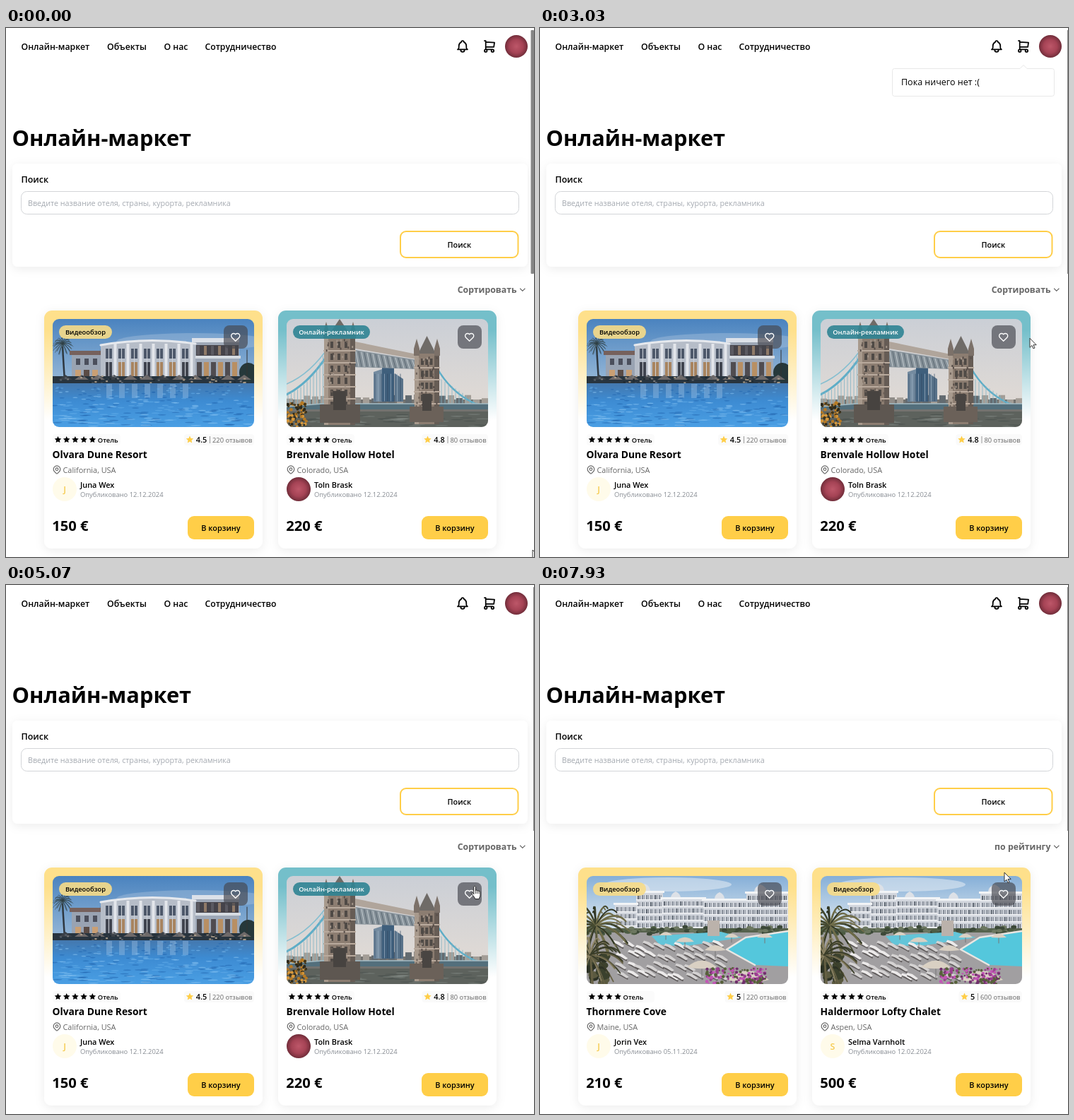
These frames come from a looping animation (747x749 px, 8 s). An HTML page:

```html
<!DOCTYPE html>
<html lang="ru">
<head>
<meta charset="utf-8">
<style>
html, body { margin: 0; width: 100%; height: 100%; overflow: hidden; background: #fff; }
svg { display: block; width: 747px; height: 749px; font-family: "Open Sans", "Noto Sans", sans-serif; }
</style>
</head>
<body>
<svg id="stage" viewBox="0 0 747 749"></svg>
<script>
const LOOP = 8000;
const YELLOW = '#ffce48', PALE = '#fee08b', TEAL = '#74bfca', GREY = '#868b92';

// Markup helpers
const rect = (x, y, w, h, fill, extra = '') =>
  `<rect x="${x}" y="${y}" width="${w}" height="${h}" fill="${fill}" ${extra}/>`;
const path = (d, fill, extra = '') => `<path d="${d}" fill="${fill}" ${extra}/>`;
const line = (d, color, width = 1, extra = '') =>
  path(d, 'none', `stroke="${color}" stroke-width="${width}" stroke-linecap="round" stroke-linejoin="round" ${extra}`);
const circle = (x, y, r, fill) => `<circle cx="${x}" cy="${y}" r="${r}" fill="${fill}"/>`;
const oval = (x, y, rx, ry, fill, extra = '') =>
  `<ellipse cx="${x}" cy="${y}" rx="${rx}" ry="${ry}" fill="${fill}" ${extra}/>`;
const text = (x, y, size, str, weight = 400, fill = '#000', anchor = 'start') =>
  `<text x="${x}" y="${y}" font-size="${size}" font-weight="${weight}" fill="${fill}" text-anchor="${anchor}">${str}</text>`;
const group = (x, y, body) => `<g transform="translate(${x} ${y})">${body}</g>`;
const many = (n, fn) => Array.from({ length: n }, (_, i) => fn(i)).join('');
// Outline icon on a 24-unit grid, centred on x, y
const icon = (x, y, scale, d, color = '#000', width = 2) =>
  `<g transform="translate(${x} ${y}) scale(${scale}) translate(-12 -12)">${line(d, color, width)}</g>`;
const gradient = (id, ...stops) => `<linearGradient id="${id}" x2="0" y2="1">` +
  stops.map(([at, color, op = 1]) => `<stop offset="${at}" stop-color="${color}" stop-opacity="${op}"/>`).join('') +
  '</linearGradient>';

const BELL = 'M10 5a2 2 0 1 1 4 0a7 7 0 0 1 4 6v3a4 4 0 0 0 2 3h-16a4 4 0 0 0 2 -3v-3a7 7 0 0 1 4 -6M9 17v1a3 3 0 0 0 6 0v-1';
const CART = 'M4 19a2 2 0 1 0 4 0a2 2 0 0 0 -4 0M15 19a2 2 0 1 0 4 0a2 2 0 0 0 -4 0M17 17h-11v-14h-2M6 5l14 1l-1 7h-13';
const HEART = 'M19.5 12.6l-7.5 7.400l-7.5 -7.400a5 5 0 1 1 7.5 -6.600a5 5 0 1 1 7.5 6.600';
const PIN = 'M9 11a3 3 0 1 0 6 0a3 3 0 0 0 -6 0M17.660 16.660l-4.240 4.240a2 2 0 0 1 -2.830 0l-4.240 -4.240a8 8 0 1 1 11.310 0z';

function star(x, y, r, fill) {
  const pts = Array.from({ length: 10 }, (_, i) => {
    const a = i * Math.PI / 5, k = i % 2 ? r * 0.48 : r;
    return `${(x + k * Math.sin(a)).toFixed(1)},${(y - k * Math.cos(a)).toFixed(1)}`;
  });
  return `<polygon points="${pts.join(' ')}" fill="${fill}"/>`;
}

let seed = 7;
const rnd = (lo, hi) => {
  seed = (seed * 16807) % 2147483647;
  return +(lo + (hi - lo) * seed / 2147483647).toFixed(1);
};
const pick = list => list[Math.floor(rnd(0, list.length - 0.06))];

// Pictures, 285 x 153
const palm = (x, y, len, colors) => many(48, i => {
  const a = i * 0.39, r = len * rnd(0.7, 1.05), c = Math.cos(a), s = Math.sin(a);
  return line(`M${x} ${y}Q${(x + r * 0.6 * c).toFixed(1)} ${(y + r * 0.6 * s - r * 0.2).toFixed(1)} ` +
    `${(x + r * c).toFixed(1)} ${(y + r * 0.8 * s + r * 0.25).toFixed(1)}`, pick(colors), len / 26);
});

function villa() {
  return rect(0, 0, 285, 95, 'url(#dusk)') +
    oval(200, 32, 110, 12, '#b4c9de', 'opacity=".35"') +
    line('M14 40L17 88', '#2e3740', 2.5) + palm(14, 35, 15, ['#2b3c43', '#3d4d50']) + palm(76, 46, 11, ['#2f4247']) +
    rect(27, 50, 45, 40, '#99a3b2') + rect(24, 45, 50, 6, '#76615c') +
    many(3, i => rect(33 + i * 12, 56, 6, 9, '#4b4f5c') + rect(32 + i * 12, 72, 8, 12, i % 2 ? '#5a4b45' : '#c99f74')) +
    rect(200, 33, 64, 56, '#9ea8b7') + rect(197, 27, 67, 6, '#dce1e9') +
    rect(203, 37, 60, 15, '#45434a') + rect(200, 52, 66, 4, '#d6dbe2') +
    many(6, i => rect(204 + i * 10, 38, 4, 13, i % 2 ? '#8f7a68' : '#5b5a62') + rect(204 + i * 10, 61, 7, 24, i % 2 ? '#b88f63' : '#504c50')) +
    path('M68 37Q135 25 202 35V89H68Z', '#b6bdc8') + line('M68 37Q135 25 202 35', '#e6e9ee', 3) +
    many(7, i => rect(75 + i * 18, 42, 9, 14, '#4d586a') + rect(75 + i * 18, 61, 9, 24, i % 3 ? '#a8845f' : '#40444f') +
      rect(79 + i * 18, 42, 1, 43, '#cdd2d9') + rect(86.5 + i * 18, 35, 4, 50, '#e3e6eb')) +
    rect(0, 81, 285, 12, '#28343e') + oval(277, 76, 13, 14, '#26383b') + line('M275 44V85', '#333', 1) +
    many(12, i => path(`M${8 + i * 23} ${86}l10 -7l10 7Z`, i % 3 ? '#6f6a6a' : '#3b4148')) +
    many(60, () => rect(rnd(10, 275), rnd(80, 91), 3, 2, pick(['#a99b88', '#59616a', '#1f2930', '#7b7b7c']))) +
    rect(0, 91, 285, 62, 'url(#pool)') +
    many(7, i => rect(76 + i * 18, 92, 8, 20, '#b9d4ee', 'opacity=".3"')) +
    many(260, () => {
      const y = rnd(93, 152);
      return oval(rnd(0, 285), y, (y - 76) / 10, 0.8, pick(['#8ac5f2', '#63aeea', '#1f63ad']), 'opacity=".55"');
    });
}

function tower(x, y, w, h) {
  const rows = Math.floor((h - 45) / 17);
  return rect(x, y + 24, w, h - 24, '#8c7d71') +
    rect(x, y + 24, 6, h - 24, '#a89a8d') + rect(x + w - 7, y + 24, 7, h - 24, '#665c55') +
    path(`M${x + 5} ${y + 25}L${x + w / 2} ${y}L${x + w - 5} ${y + 25}Z`, '#6f6b67') +
    [x + 3, x + w - 3].map(c => path(`M${c - 4} ${y + 28}V${y + 18}L${c} ${y + 4}L${c + 4} ${y + 18}V${y + 28}Z`, '#7c7169')).join('') +
    many(rows, r => many(3, c => rect(x + 9 + c * (w - 20) / 2.4, y + 32 + r * 17, 4, 9, '#4f4a46')) +
      rect(x - 1, y + 44 + r * 17, w + 2, 2, '#b9aa9d')) +
    many(60, () => rect(x + rnd(1, w - 4), y + rnd(28, h - 5), 2, 3, pick(['#6b6058', '#a3968a', '#574e49'])));
}

function bridge() {
  return rect(0, 0, 285, 153, 'url(#haze)') +
    rect(0, 114, 285, 23, '#73726f') +
    many(24, i => rect(i * 12, 114 - rnd(0, 7), 9, 14, pick(['#8f8c88', '#636b70', '#a39d96']))) +
    path('M123 117V75L135 71V117Z', '#748ba0') + path('M135 117V66H152V117Z', '#3f5f7c') + path('M153 117V77L165 85V117Z', '#5a738a') +
    many(9, i => line(`M${125 + i * 4.5} 78V116`, i % 2 ? '#9fb3c4' : '#2f4a63', 0.7)) +
    path('M0 131H285V153H0Z', '#5d625d') +
    many(60, () => oval(rnd(0, 285), rnd(135, 152), 9, 0.7, pick(['#8a918d', '#434a49']), 'opacity=".5"')) +
    line('M0 107Q38 88 70 31', '#5eadc7', 3) + line('M0 92Q34 78 62 36', '#87bfd0', 1.6) +
    many(12, i => line(`M${2 + i * 4.5} ${104 - i * i * 0.42}V124`, '#83b4c5', 0.8)) +
    line('M212 68Q236 112 285 127', '#5eadc7', 2.5) +
    many(12, i => line(`M${219 + i * 5} ${86 + i * 3.2}V126`, '#83b4c5', 0.8)) +
    path('M92 31L184 50V57L92 41Z', '#b0a59b') + path('M92 43L184 58V71L92 68Z', '#87929a') +
    many(23, i => line(`M${94 + i * 4} ${45 + i * 0.65}l4 ${22 - i * 0.5}`, i % 2 ? '#c3ccd0' : '#596771', 1)) +
    path('M0 124L50 120H285V128H0Z', '#536f7c') + line('M0 124L50 120H285', '#a6bdc5', 1.4) +
    tower(53, 0, 44, 150) + tower(181, 24, 35, 125) +
    rect(47, 121, 57, 26, '#5e5751') + rect(174, 124, 48, 22, '#6b6159') +
    rect(66, 102, 18, 27, '#474340') + rect(192, 106, 13, 24, '#494542') +
    many(90, () => circle(rnd(0, 28), rnd(119, 153), rnd(0.8, 2.6), pick(['#b77a24', '#41351c', '#d7983b', '#2d2a1d'])));
}

function terrace() {
  const block = (x, y, w, cols, rows) => rect(x, y, w, 86 - y, '#d3d7de') + rect(x - 2, y, w + 4, 3, '#f2f4f6') +
    many(rows, r => many(cols, c => rect(x + 2 + c * (w - 2) / cols, y + 6 + r * 10, (w - 2) / cols - 2, 7, (r + c) % 4 ? '#878e99' : '#5e6671') +
      rect(x + 4 + c * (w - 2) / cols, y + 6 + r * 10, 1.2, 7, '#c5cad1')) +
      rect(x, y + 12 + r * 10, w, 1.4, '#f3f4f6'));
  const dome = (x, y, r) => path(`M${x - r} ${y}Q${x - r} ${y - r} ${x} ${y - r - 3}Q${x + r} ${y - r} ${x + r} ${y}Z`, '#dde1e7');
  return rect(0, 0, 285, 100, 'url(#day)') +
    oval(115, 12, 90, 10, '#e5edf4', 'opacity=".55"') +
    dome(82, 22, 8) + dome(126, 32, 7) + dome(188, 33, 7) + dome(246, 24, 9) +
    block(70, 21, 38, 6, 6) + block(107, 30, 60, 10, 5) + block(165, 32, 62, 10, 5) + block(226, 22, 59, 9, 6) + block(40, 38, 31, 5, 4) +
    rect(0, 78, 285, 75, '#a19fa1') + rect(0, 74, 285, 6, '#56624d') +
    many(70, () => oval(rnd(0, 285), rnd(72, 82), 4, 2.5, pick(['#4c5c43', '#6c7760', '#3c4938']))) +
    path('M92 85L190 79L220 87L136 100L103 97Z', '#63c5d9') +
    path('M225 87L285 78V128L238 126L198 104Z', '#54c7dc') + line('M285 78L225 87L198 104L238 126', '#e9e6e2', 2.5) +
    path('M171 63h17v22h-17Z', '#bbb2ab') +
    many(44, i => {
      const x = 42 + (i % 11) * 14 + rnd(-4, 4), y = 94 + Math.floor(i / 11) * 14 + rnd(-4, 4);
      return line(`M${x} ${y + 4}l13 7`, '#605c5c', 2) + path(`M${x} ${y}l7 2l8 6l-3 2l-8 -5l-6 -2Z`, pick(['#eceaea', '#d4d2d2']));
    }) +
    [[139, 90, 13], [182, 102, 15], [112, 81, 9], [252, 84, 11], [163, 126, 21], [228, 144, 30], [205, 84, 10]].map(([x, y, r]) =>
      line(`M${x} ${y}v${r}`, '#777', 1) + path(`M${x - r} ${y + 3}Q${x} ${y - r * 0.75} ${x + r} ${y + 3}Q${x} ${y + r * 0.35} ${x - r} ${y + 3}Z`, '#d9d0c3')).join('') +
    many(150, () => circle(rnd(170, 254), rnd(131, 153), rnd(1, 2.6), pick(['#c257b5', '#99408f', '#57613b', '#6f2f6b']))) +
    many(22, () => oval(rnd(0, 28), rnd(112, 153), 7, 5, pick(['#3b412d', '#2c3124', '#5b5a40']))) +
    palm(13, 70, 48, ['#454a30', '#2f3524', '#706d4a']) + palm(5, 112, 46, ['#666044', '#3a3d29', '#8b8263']);
}

// Interface pieces
const bigButton = label => rect(203, 291, 94, 33, YELLOW, 'rx="9"') + text(250, 312, 10.9, label, 600, '#000', 'middle');

function card(x, c) {
  const starX = c.sep - (c.rate.length > 1 ? 28 : 18.5);
  return group(x, 400,
    rect(0, 0, 309, 337, '#fff', 'rx="11" filter="url(#soft)"') +
    rect(0, 0, 309, 337, `url(#${c.tint})`, 'rx="11"') +
    group(12, 12, `<g clip-path="url(#photo)">${c.art}</g>`) +
    rect(21, 21, c.tagW, 19, c.tint === 'gold' ? '#f8dc88' : '#2f8494', 'rx="9.5" opacity=".9"') +
    text(21 + c.tagW / 2, 34.3, 9.36, c.tag, 600, c.tint === 'gold' ? '#000' : '#fff', 'middle') +
    rect(254, 21, 34, 33, '#45464e', 'rx="8" opacity=".66"') + icon(270.7, 37.8, 0.68, HEART, '#fff') +
    rect(12, 175, 96, 16, '#fbfbfb', 'rx="4"') + rect(starX - 8, 175, 305 - starX, 16, '#fafafa', 'rx="4"') +
    many(c.stars, i => star(19.5 + 12.2 * i, 183, 5, '#000')) +
    text(14.8 + 12.2 * c.stars, 186.6, 9.36, 'Отель', 600) +
    star(starX, 183, 5.5, YELLOW) + text(c.sep - 3.8, 187, 10.9, c.rate, 600, '#000', 'end') +
    rect(c.sep, 178, 1, 10, '#999') + text(c.sep + 4, 186.6, 9.36, c.reviews + ' отзывов', 400, '#666') +
    text(11.5, 209.3, 13.8, c.name, 700) + icon(18, 225.3, 0.6, PIN, '#666') +
    text(26.5, 229.6, 10.9, c.place, 400, '#666') +
    circle(29, 253, 17, c.letter ? '#fffbea' : 'url(#face)') +
    (c.letter ? text(29, 257.5, 12.5, c.letter, 600, '#f6cb50', 'middle') : '') +
    text(51, 251, 10.9, c.host, 600) + text(51, 263.8, 9.4, 'Опубликовано ' + c.date, 400, GREY) +
    text(11.3, 312, 20.2, c.price + ' €', 700) + bigButton('В корзину'));
}

const popBox = h => path(`M498.5 60.5q0 -3 3 -3H679l5 -5l5 5H724.5q3 0 3 3V${h + 54.5}q0 3 -3 3H501.5q-3 0 -3 -3Z`, '#fff', 'stroke="#e8e8e8"');
const gold = { tint: 'gold', tag: 'Видеообзор', tagW: 75 };
const resort = terrace();
const HOTEL = 'Brenvale Hollow Hotel';

const firstCards =
  card(54, { ...gold, art: villa(), stars: 5, rate: '4.5', sep: 234, reviews: 220, name: 'Olvara Dune Resort',
    place: 'California, USA', letter: 'J', host: 'Juna Wex', date: '12.12.2024', price: 150 }) +
  card(385, { tint: 'teal', tag: 'Онлайн-рекламник', tagW: 109, art: bridge(), stars: 5, rate: '4.8', sep: 239.5, reviews: 80,
    name: HOTEL, place: 'Colorado, USA', host: 'Toln Brask', date: '12.12.2024', price: 220 });
const sortedCards =
  card(54, { ...gold, art: resort, stars: 4, rate: '5', sep: 234, reviews: 220, name: 'Thornmere Cove',
    place: 'Maine, USA', letter: 'J', host: 'Jorin Vex', date: '05.11.2024', price: 210 }) +
  card(385, { ...gold, art: resort, stars: 5, rate: '5', sep: 234, reviews: 600, name: 'Haldermoor Lofty Chalet',
    place: 'Aspen, USA', letter: 'S', host: 'Selma Varnholt', date: '12.02.2024', price: 500 });

const options = ['по рейтингу', 'по цене (сначала дешевле)', 'по цене (сначала дорогие)',
  'по дате добавления', 'сначала онлайн-рекламники', 'сначала видеообзоры'];

document.getElementById('stage').innerHTML = `<defs>
  ${gradient('gold', [0, PALE], [0.08, PALE], [0.46, PALE, 0])}${gradient('teal', [0, TEAL], [0.08, TEAL], [0.46, TEAL, 0])}
  ${gradient('dusk', [0, '#4a83bf'], [1, '#9bbbd9'])}${gradient('pool', [0, '#4478ae'], [0.4, '#3d8bd2'], [1, '#4a9fe4'])}
  ${gradient('haze', [0, '#cbcfd6'], [0.7, '#ded9d5'], [1, '#d8d0c9'])}${gradient('day', [0, '#85afd8'], [0.6, '#cfdeeb'])}
  <radialGradient id="face"><stop offset="0" stop-color="#bd5769"/><stop offset=".6" stop-color="#a54355"/><stop offset="1" stop-color="#712d3a"/></radialGradient>
  <filter id="soft" x="-10%" y="-20%" width="120%" height="140%"><feDropShadow dx="0" dy="3" stdDeviation="7" flood-opacity=".075"/></filter>
  <clipPath id="photo"><rect width="285" height="153" rx="9"/></clipPath></defs>` +
  [[21.5, 'Онлайн-маркет'], [143, 'Объекты'], [223.5, 'О нас'], [281.5, 'Сотрудничество']].map(([x, s]) => text(x, 30.5, 12.25, s, 600)).join('') +
  icon(646, 26, 0.88, BELL) + icon(684, 26, 0.88, CART) +
  `<g id="badge">${circle(691.3, 18.8, 7.2, YELLOW)}${text(691.3, 22, 8.6, '1', 600, '#000', 'middle')}</g>` +
  circle(722, 26, 16, 'url(#face)') +
  text(8.5, 167, 30.8, 'Онлайн-маркет', 700) +
  rect(9, 192, 729, 146, '#fff', 'rx="8" filter="url(#soft)"') +
  text(21.5, 219, 12.5, 'Поиск', 600) +
  rect(21.5, 231.5, 704, 32, '#fff', 'rx="8" stroke="#d3d5d8"') +
  text(31, 251.8, 10.75, 'Введите название отеля, страны, курорта, рекламника', 400, '#a5aab1') +
  rect(558, 288, 166.5, 37, '#fff', `rx="8" stroke="${YELLOW}" stroke-width="2"`) +
  text(641.3, 311, 10.9, 'Поиск', 600, '#000', 'middle') +
  '<text id="sort" x="722.5" y="375" font-size="12.3" font-weight="700" fill="#666" text-anchor="end"></text>' +
  line('M727.500 369l3.300 3.300l3.300 -3.300', '#666', 1.1) +
  `<g id="first">${firstCards}<g id="added">` +
  rect(587, 690, 96, 35, '#fff') + rect(574.5, 691, 107.5, 33, PALE, 'rx="9"') +
  line('M586 708l3.300 3.300l6.500 -7', '#000', 1.4) + text(606, 712, 10.9, 'В Корзине', 600) + '</g></g>' +
  `<g id="sorted">${sortedCards}</g>` +
  `<g id="popItem">${popBox(58)}${text(511, 81, 12.5, HOTEL, 600)}${text(511, 100, 12.5, '220 €')}${line('M700 82.500l8 8m0 -8l-8 8', '#333', 1)}</g>` +
  `<g id="popEmpty">${popBox(39)}${text(511, 81, 12.5, 'Пока ничего нет :(')}</g>` +
  `<g id="menu">${rect(550.5, 391.5, 187, 181, '#fff', 'rx="7" stroke="#ececec" filter="url(#soft)"')}` +
  rect(558, 397, 172, 30, '#f8f8f8', 'id="hover" rx="4"') +
  options.map((s, i) => text(566, 416 + i * 28.9, 10.9, s)).join('') + '</g>' +
  rect(742.5, 3, 4.5, 345, '#858585', 'id="barWide" rx="1"') + rect(746, 3, 1, 345, '#858585', 'id="barThin"') +
  `<g id="cursor">` +
  `<g id="arrow">${path('M0 0V13L3 10.200L5 14.600L7 13.700L5 9.400H9.200Z', '#fff', 'stroke="#222" stroke-width=".9"')}</g>` +
  `<g id="hand">${group(-4.8, -1, path('M3.500 12V2.200c0 -2 2.600 -2 2.600 0V7c0 -1 2.200 -1 2.300 .5c.2 -1 2.200 -.8 2.300 .6c.2 -.8 2 -.6 2 .8V13c0 3 -1.500 3.500 -1.800 5.800H5.500C5 16 .8 13 .6 10.800C.6 9.300 2.500 9.600 3.500 12Z', '#fff', 'stroke="#222"') + line('M6.100 7v4M8.400 8v3M10.700 8.500v2.500', '#222', 0.8))}</g>` +
  `<g id="beam">${line('M-2.500 -6.500H-1Q0 -6.500 0 -5.500V5.500Q0 6.500 -1 6.500H-2.500M2.500 -6.500H1Q0 -6.500 0 -5.500M0 5.500Q0 6.500 1 6.500H2.500', '#333', 1)}</g></g>`;

// Pointer track: time, x, y
const track = [
  [0, 745, 739], [200, 745, 739], [500, 655, 713], [640, 640, 707], [780, 640, 706], [1000, 641, 592],
  [1170, 659, 221], [1400, 684, 24], [1570, 688, 20], [1730, 688, 20], [1930, 690, 40], [2070, 690, 40],
  [2130, 695, 45], [2350, 704, 87], [2520, 704, 87], [2870, 700, 290], [3000, 712, 400], [3150, 620, 590],
  [3300, 367, 500], [3450, 520, 618], [3600, 640, 585], [3700, 650, 545], [3830, 654, 447], [4050, 680, 470],
  [4250, 660, 430], [4470, 674, 545], [4600, 674, 545], [4750, 655, 460], [4900, 645, 440], [5070, 663, 427],
  [5330, 684, 370], [5800, 684, 370], [6230, 659, 411], [7469, 659, 411], [7470, 680, 524], [7840, 680, 524],
  [7930, 657, 407], [8000, 657, 407]
];
const hot = [[672, 10, 700, 58], [697, 80, 711, 94], [588, 691, 682, 724], [639, 421, 673, 454], [639, 363, 735, 380]];

function pointer(t) {
  const i = track.findIndex(k => k[0] > t);
  const [t0, x0, y0] = track[i - 1], [t1, x1, y1] = track[i];
  const p = (t - t0) / (t1 - t0);
  return [x0 + (x1 - x0) * p, y0 + (y1 - y0) * p];
}

const el = id => document.getElementById(id);
const show = (id, on) => { el(id).style.display = on ? '' : 'none'; };
const ramp = (t, a, b) => Math.min(1, Math.max(0, (t - a) / (b - a)));
const inside = (x, y, [l, t, r, b]) => x >= l && x <= r && y >= t && y <= b;

function draw(t) {
  const inCart = t >= 740 && t < 2450, done = t >= 7470, open = t >= 5500 && !done;
  const [x, y] = pointer(t);
  const overMenu = open && inside(x, y, [550, 391, 738, 573]);
  const isHand = overMenu || hot.some(h => inside(x, y, h));
  const isBeam = inside(x, y, [21, 207, 725, 264]);

  show('barWide', t < 600);
  show('barThin', t >= 600);
  show('badge', inCart);
  show('added', inCart);
  show('first', !done);
  show('sorted', done);
  show('menu', open);
  show('hover', overMenu && y >= 397);
  el('popItem').style.opacity = t < 2450 ? ramp(t, 1700, 1930) : 0;
  el('popEmpty').style.opacity = t < 2450 ? 0 : 1 - ramp(t, 3950, 4150);
  el('sort').textContent = done ? options[0] : 'Сортировать';
  show('hand', isHand);
  show('beam', isBeam);
  show('arrow', !isHand && !isBeam);
  el('cursor').setAttribute('transform', `translate(${x.toFixed(1)} ${y.toFixed(1)})`);
}

const start = performance.now();
function tick() {
  draw((performance.now() - start) % LOOP);
  requestAnimationFrame(tick);
}
tick();
</script>
</body>
</html>
```
